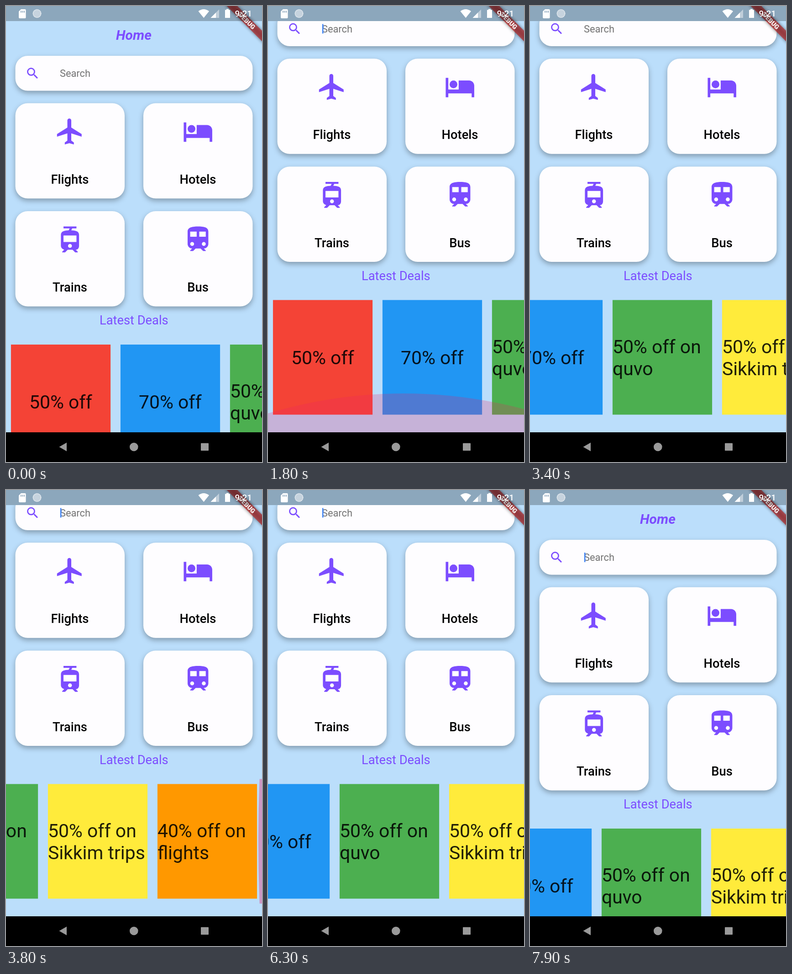
An HTML page for the animation above (8 s loop, 561x998 px).

```html
<!DOCTYPE html>
<html lang="en">
<head>
<meta charset="utf-8">
<title>Travel home screen</title>
<style>
  html, body { margin: 0; width: 100%; height: 100%; overflow: hidden; background: #bbdefb; }
  svg { display: block; width: 561px; height: 998px; font-family: Roboto, "Noto Sans", sans-serif; }
  .card { fill: #fefdff; filter: drop-shadow(0 5px 6px rgba(0, 0, 0, .3)); }
  .purple { fill: #7c4dff; }
  .mid { text-anchor: middle; }
  .label { font-size: 27.3px; font-weight: 500; }
  .deal { font-size: 40.9px; fill-opacity: .87; }
  .glow { fill: #e91e63; }
</style>
</head>
<body>
<svg viewBox="0 0 561 998">
  <defs>
    <clipPath id="view"><rect y="33" width="561" height="900"/></clipPath>
    <clipPath id="strip"><rect y="730" width="561" height="272.7"/></clipPath>
    <filter id="soft" x="-30%" y="-100%" width="160%" height="300%"><feGaussianBlur stdDeviation="3.5"/></filter>
  </defs>
  <rect width="561" height="998" fill="#bbdefb"/>

  <g clip-path="url(#view)">
    <g id="page">
      <text class="purple mid" x="280" y="74" font-size="30" font-weight="700" font-style="italic">Home</text>
      <rect class="card" x="20.5" y="109" width="520" height="76.5" rx="27"/>
      <path class="purple" transform="translate(42 131) scale(1.364)" d="M15.5 14h-.79l-.28-.27A6.47 6.47 0 0 0 16 9.5 6.5 6.5 0 1 0 9.5 16c1.61 0 3.09-.59 4.23-1.57l.27.28v.79l5 4.99L20.49 19zm-6 0a4.5 4.5 0 1 1 0-9 4.5 4.5 0 0 1 0 9z"/>
      <text x="118" y="155" font-size="21.8" fill="#727272">Search</text>
      <rect id="caret" x="118.8" y="137" width="2.7" height="20.8" fill="#4285f4"/>
      <g id="tiles"></g>
      <text class="purple mid" x="280.3" y="697" font-size="27.3">Latest Deals</text>
      <g clip-path="url(#strip)">
        <g id="deals"></g>
        <ellipse id="sideGlow" class="glow" cx="4061" cy="866" rx="3500" ry="3500"/>
      </g>
    </g>
    <circle id="endGlow" class="glow" cx="297" cy="1968" r="1035"/>
  </g>

  <!-- corner banner -->
  <g transform="translate(561 0) rotate(45)">
    <rect x="-60" y="38.2" width="120" height="16.4" fill-opacity=".5" filter="url(#soft)"/>
    <rect x="-60" y="38.2" width="120" height="16.4" fill="#b71c1c" fill-opacity=".63"/>
    <text class="mid" y="51.3" font-size="13.9" font-weight="900" fill="#fff">DEBUG</text>
  </g>

  <!-- status bar -->
  <rect width="561" height="33" fill-opacity=".25"/>
  <g fill="#fff">
    <path d="M33 7H41.500Q43.500 7 43.500 9V25Q43.500 27 41.500 27H30Q28 27 28 25V12z"/>
    <path d="M33 10.500v4M36.500 10.500v4M40 10.500v4" stroke="#8ca6bc" stroke-width="1.8"/>
    <circle cx="68" cy="16.500" r="9.500" fill-opacity=".5"/>
    <circle cx="68" cy="16.500" r="8.500" fill="none" stroke="#fff" stroke-opacity=".6" stroke-width="1.6" stroke-dasharray="2 1.200"/>
    <path d="M421.500 11.500Q433.300 2.500 445 11.500L433.300 26z"/>
    <path d="M467 7.500V26H448.500z" fill-opacity=".45"/>
    <path d="M460 14.500V26H448.500z"/>
    <path d="M483 6.500h5v2h3V26h-11V8.500h3z"/>
    <text x="501.500" y="23.300" font-size="19.1" font-weight="500">9:21</text>
  </g>

  <!-- navigation bar -->
  <rect y="933" width="561" height="65"/>
  <g fill="#9a9a9a">
    <path d="M116.500 965L133 955.500V974.500z"/>
    <circle cx="280.300" cy="965" r="9.300"/>
    <rect x="427" y="956.700" width="17" height="16.600" rx="1"/>
  </g>
</svg>

<script>
const $ = id => document.getElementById(id);

const icons = {
  flight: "M21 16v-2l-8-5V3.500c0-.83-.67-1.500-1.500-1.500S10 2.670 10 3.500V9l-8 5v2l8-2.500V19l-2 1.500V22l3.500-1 3.500 1v-1.500L13 19v-5.500l8 2.500z",
  bed: "M7 13a3 3 0 1 0 0-6 3 3 0 0 0 0 6zm12-6h-8v7H3V5H1v15h2v-3h18v3h2v-9c0-2.210-1.790-4-4-4z",
  tram: "M19 16.940V8.500c0-2.790-2.610-3.400-6.010-3.490l.76-1.510H17V2H7v1.500h4.750l-.76 1.520C7.860 5.110 5 5.730 5 8.500v8.440c0 1.450 1.190 2.660 2.590 2.970L6 21.500v.5h2.230l2-2H14l2 2h2v-.5L16.500 20h-.08c1.690 0 2.580-1.370 2.580-3.060zm-7 1.560a1.500 1.500 0 1 1 0-3 1.500 1.500 0 0 1 0 3zm5-4.500H7V9h10z",
  train: "M12 2c-4 0-8 .5-8 4v9.500C4 17.430 5.570 19 7.500 19L6 20.500v.5h2.230l2-2H14l2 2h2v-.5L16.500 19c1.930 0 3.500-1.570 3.500-3.500V6c0-3.500-3.580-4-8-4zM7.500 17a1.500 1.500 0 1 1 0-3 1.500 1.500 0 0 1 0 3zm3.500-7H6V6h5zm2 0V6h5v4zm3.500 7a1.500 1.500 0 1 1 0-3 1.500 1.500 0 0 1 0 3z"
};

const tiles = [["Flights", "flight"], ["Hotels", "bed"], ["Trains", "tram"], ["Bus", "train"]];
$("tiles").innerHTML = tiles.map(([name, icon], i) => {
  const x = 20.5 + (i % 2) * 280.5, y = 212.7 + (i >> 1) * 236.2;
  return `<g transform="translate(${x} ${y})">
    <rect class="card" width="239.5" height="208.6" rx="27"/>
    <path class="purple" fill-rule="evenodd" transform="translate(85.6 27.8) scale(2.841)" d="${icons[icon]}"/>
    <text class="label mid" x="119.5" y="176.300">${name}</text></g>`;
}).join("");

const deals = [
  ["#f44336", "50% off"],
  ["#2196f3", "70% off"],
  ["#4caf50", "50% off on", "quvo"],
  ["#ffeb3b", "50% off on", "Sikkim trips"],
  ["#ff9800", "40% off on", "flights"]
];
$("deals").innerHTML = deals.map(([color, ...lines], i) => {
  const single = lines.length === 1;
  const text = lines.map((line, n) => single
    ? `<text class="deal mid" x="109" y="140">${line}</text>`
    : `<text class="deal" y="${116 + n * 48}">${line}</text>`).join("");
  return `<g transform="translate(${10.9 + i * 240} 741)">
    <rect width="218.2" height="250.9" fill="${color}"/>${text}</g>`;
}).join("");

// Tracks of [time in ms, value], linear between steps
const scrollY = [[400, 0], [600, 12], [900, 52], [1200, 90], [1300, 97.5],
  [6700, 97.5], [6900, 88], [7200, 45], [7400, 14], [7600, 0]];
const scrollX = [[2600, 0], [2900, 5.5], [3000, 5.5], [3100, 28], [3300, 190], [3500, 430], [3700, 639],
  [5000, 639], [5100, 600], [5300, 450.5], [5500, 382], [5700, 350], [5800, 350], [6200, 334]];
const endPull = [[1200, 0], [1800, 1], [1900, 1], [2500, 0]];
const sidePull = [[3600, 0], [3800, 8], [3900, 10], [4200, 0]];
const caretOn = [[700, 1200], [1700, 2200], [2700, 3200], [3700, 4200], [4700, 5200],
  [5900, 6400], [6800, 7300], [7700, 8000]];

function at(track, t) {
  const i = track.findIndex(step => step[0] > t);
  if (i === 0) return track[0][1];
  if (i < 0) return track[track.length - 1][1];
  const [t0, a] = track[i - 1], [t1, b] = track[i];
  return a + (b - a) * (t - t0) / (t1 - t0);
}

const LOOP = 8000, TICK = 100;
const start = performance.now();

function draw() {
  const elapsed = Math.max(0, performance.now() - start) % LOOP;
  const t = Math.floor(elapsed / TICK) * TICK;
  const pull = at(endPull, t), side = at(sidePull, t);

  $("page").setAttribute("transform", `translate(0 ${-at(scrollY, t)})`);
  $("deals").setAttribute("transform", `translate(${-at(scrollX, t)} 0)`);
  $("endGlow").setAttribute("transform", `translate(0 ${-85 * pull})`);
  $("endGlow").setAttribute("opacity", .23 * pull);
  $("sideGlow").setAttribute("transform", `translate(${-side} 0)`);
  $("sideGlow").setAttribute("opacity", Math.min(.36, side * .045));
  $("caret").setAttribute("opacity", caretOn.some(([a, b]) => t >= a && t < b) ? 1 : 0);
  requestAnimationFrame(draw);
}
draw();
</script>
</body>
</html>
```
